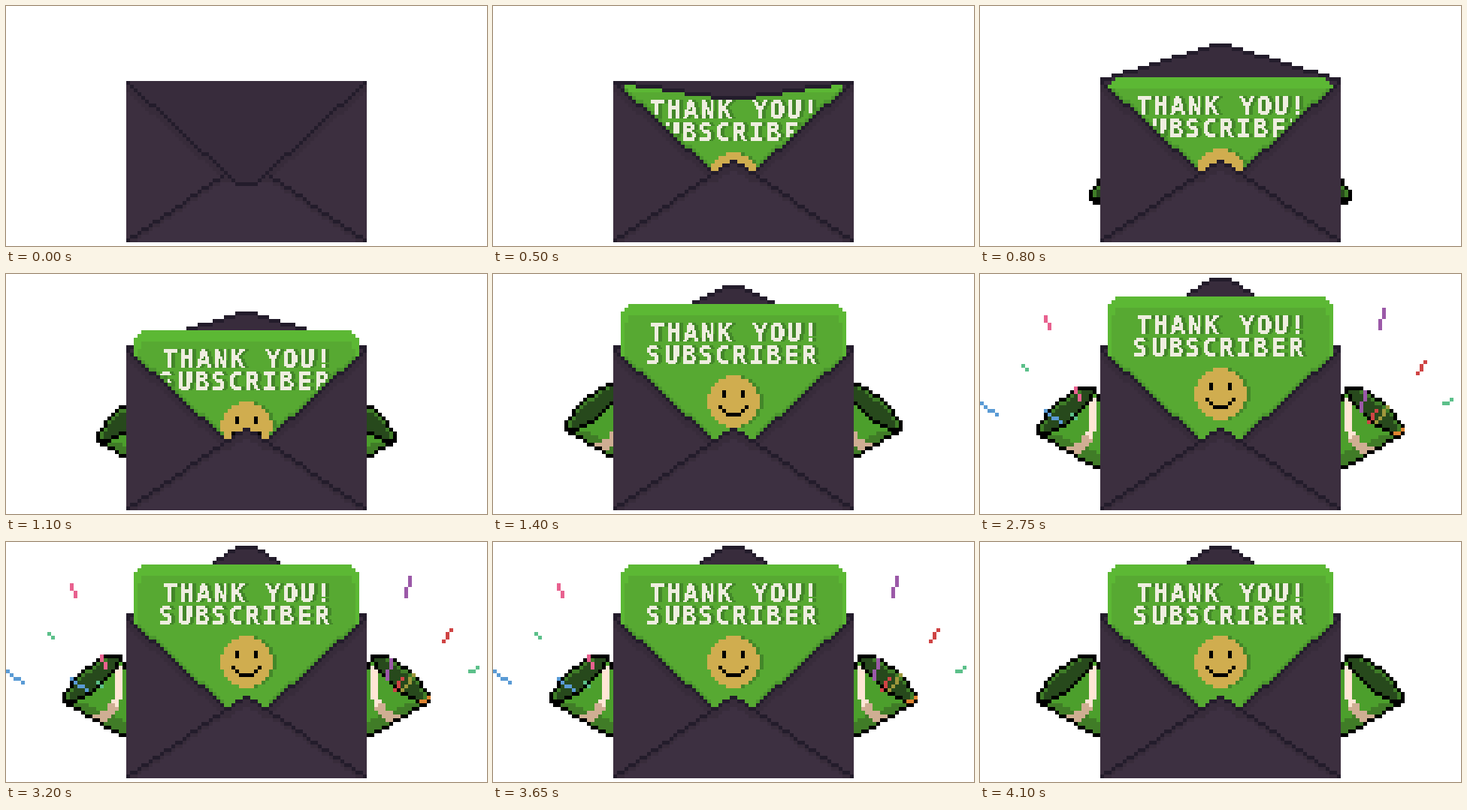
Animation of 640x320 px, one loop 5600 ms. Source, as an HTML page with a canvas:

```html
<!DOCTYPE html>
<html lang="en">
<head>
<meta charset="utf-8">
<title>Thank you card</title>
<style>
  html, body { margin: 0; width: 100%; height: 100%; overflow: hidden; background: #fff; }
  canvas { display: block; width: 100%; height: 100%; image-rendering: pixelated; }
</style>
</head>
<body>
<canvas id="stage" width="640" height="320" role="img" aria-label="THANK YOU! SUBSCRIBER"></canvas>
<script>
const ctx = document.getElementById('stage').getContext('2d');
const LOOP = 5600, CELL = 5, COLS = 128, TEXT_CELL = 2.5;
const INK = '#231c2b', FLAP = '#382c3c', SIDE = '#3c2f3f', FRONT = '#3d3041', SHADE = '#372b3a';
const GREEN = '#57a932', LIGHT = '#5cb834', DARK = '#438729', GOLD = '#d0ad4f', BLACK = '#000';

const clamp01 = v => Math.max(0, Math.min(1, v));
const smooth = p => p * p * (3 - 2 * p);
const mix = (a, b, p) => Math.round(a + (b - a) * p);

function px(x, y, w, h, color) {
  ctx.fillStyle = color;
  ctx.fillRect(x * CELL, y * CELL, w * CELL, h * CELL);
}

// Envelope

// Runs fn for each envelope column with its distance from the nearer side.
function columns(fn) {
  for (let x = 32; x < 96; x++) fn(x, Math.min(x, COLS - 1 - x) - 32);
}

const seam = d => Math.round(62 - d * 21 / 31);
const flapEdge = (d, h) => Math.trunc(h * Math.min(1, 1.1 * (d + 0.5) / 32));

function flapUp(h) {
  columns((x, d) => {
    const top = 19 + flapEdge(d, h);
    px(x, top, 1, 24 - top, FLAP);
    px(x, top, 1, 1, INK);
  });
}

function flapDown(h) {
  columns((x, d) => {
    const e = flapEdge(d, h);
    px(x, 20, 1, e, FLAP);
    px(x, 20 + e, 1, 1, INK);
  });
}

function pocket() {
  columns((x, d) => {
    const s = seam(d);
    const top = Math.min(Math.round(20 + d * 12 / 13), s);
    if (d > 2 && top < s) px(x, top - 1, 1, 1, '#4b962d');
    px(x, top, 1, s - top, SIDE);
    px(x, s, 1, 63 - s, FRONT);
    px(x, top + 1, 1, 2, SHADE);
    px(x, s + 1, 1, Math.min(1, 62 - s), SHADE);
    px(x, top, 1, 1, INK);
    px(x, s, 1, 1, INK);
  });
}

// Card

// Renders the two lines coarsely and hardens their edges into blocks.
function textSprite(color) {
  const sprite = document.createElement('canvas');
  sprite.width = 256;
  sprite.height = 26;
  const g = sprite.getContext('2d');
  g.font = 'bold 13.6px "DejaVu Sans Mono", monospace';
  g.textAlign = 'center';
  g.fillStyle = color;
  const line = (text, x, y) =>
    [...text].forEach((ch, i) => g.fillText(ch, Math.round(x + i * 9.15), y));
  line('THANK YOU!', 86.6, 10);
  line('SUBSCRIBER', 85.4, 22);
  const image = g.getImageData(0, 0, sprite.width, sprite.height);
  for (let i = 3; i < image.data.length; i += 4) image.data[i] = image.data[i] > 115 ? 255 : 0;
  g.putImageData(image, 0, 0);
  return sprite;
}
const words = textSprite('#efeee0'), wordShade = textSprite(DARK);

function disc(cx, cy, r, color) {
  for (let dy = -r; dy < r; dy++) {
    const half = Math.round(Math.sqrt(r * r - 1 - (dy + 0.5) ** 2));
    px(cx - half, cy + dy, half * 2, 1, color);
  }
}

function face(y) {
  disc(65, y, 7, DARK);
  disc(64, y, 7, GOLD);
  for (const x of [61, 66]) px(x, y - 3, 1, 2, BLACK);
  for (let x = 60; x < 68; x++) px(x, y + Math.min(3, 4.5 - Math.abs(x - 63.5)), 1, 1, BLACK);
}

function card(y) {
  for (let i = 0; i < 3; i++) px(36 - i, y + i, 56 + 2 * i, 44 - y, LIGHT);
  px(36, y + 3, 56, 43 - y, GREEN);
  px(35, y + 5, 58, 41 - y, GREEN);
  ctx.imageSmoothingEnabled = false;
  for (const [sprite, shift] of [[wordShade, CELL], [words, 0]]) {
    ctx.drawImage(sprite, shift, (y + 5) * CELL, sprite.width * TEXT_CELL, sprite.height * TEXT_CELL);
  }
  face(y + 26);
}

// Party poppers

// s runs across the mouth, n along the cone.
function axes(x, y) {
  const dx = x + 0.5 - 22.9, dy = y + 0.5 - 36.3;
  return [0.76 * dx - 0.65 * dy, 0.65 * dx + 0.76 * dy];
}
function inMouth(x, y) {
  const [s, n] = axes(x, y);
  return (s / 9.8) ** 2 + (n / 3.2) ** 2 < 1;
}
function inPopper(x, y) {
  const [s, n] = axes(x, y);
  return inMouth(x, y) || (n > 0 && Math.abs(s) < 10.2 - 0.35 * n);
}
const onEdge = (test, x, y) =>
  !(test(x - 1, y) && test(x + 1, y) && test(x, y - 1) && test(x, y + 1));

function popperColor(x, y) {
  if (!inPopper(x, y)) return null;
  const [s, n] = axes(x, y);
  if (inMouth(x, y)) {
    if (onEdge(inMouth, x, y)) return BLACK;
    return (s / 8.8) ** 2 + ((n - 0.8) / 2.4) ** 2 < 1 ? '#27491c' : '#3f7d27';
  }
  if (onEdge(inPopper, x, y)) return BLACK;
  const band = 9.9 - 0.073 * (s + 3) ** 2;
  if (Math.abs(n - band) < 1.2) return s > 0 ? '#ffe6d5' : '#cfae93';
  return s > 0.5 * n - 8 ? '#4c9f2c' : '#407c27';
}

// Only the part beside the envelope is visible.
function poppers(ox, oy) {
  for (let y = 28; y < 62; y++) {
    for (let x = 14; x + ox < 33; x++) {
      const color = popperColor(x, y);
      if (!color) continue;
      px(x + ox, y + oy, 1, 1, color);
      px(COLS - 1 - x - ox, y + oy, 1, 1, color);
    }
  }
}

// Streamers fly through five phases; life holds the first and last one seen.
const STREAMERS = [
  { color: '#9b59a8', from: [101, 35], to: [107, 9], dash: [-1, 5], life: [0, 4] },
  { color: '#e8618f', from: [26, 34], to: [17, 11], dash: [1, 3], life: [0, 4] },
  { color: '#5a9bd5', from: [20, 36], to: [0, 34], dash: [4, 3], life: [0, 4] },
  { color: '#5cc08a', from: [26, 39], to: [11, 24], dash: [1, 1], life: [1, 4] },
  { color: '#cf4444', from: [102, 38], to: [118, 23], dash: [-2, 3], life: [1, 4] },
  { color: '#a0983c', from: [105, 38], to: [124, 18], dash: [-3, 4], life: [0, 3] },
  { color: '#e0842f', from: [108, 41], to: [134, 38], dash: [-2, 1], life: [0, 2] },
  { color: '#5cc08a', from: [101, 38], to: [125, 33], dash: [-2, 1], life: [2, 4] }
];

function burst(phase) {
  const p = smooth(phase / 4);
  for (const { color, from, to, dash: [dx, dy], life } of STREAMERS) {
    if (phase < life[0] || phase > life[1]) continue;
    const x = mix(from[0], to[0], p), y = mix(from[1], to[1], p);
    const length = Math.max(Math.abs(dx), Math.abs(dy));
    const shown = phase ? length : length >> 1;
    for (let i = 0; i <= shown; i++) px(mix(x, x + dx, i / length), mix(y, y + dy, i / length), 1, 1, color);
  }
}

// A new burst every three steps; the first and last flights show fully.
function confetti(k) {
  const last = 15, near = k % 3;
  if (k < 0 || k > last) return;
  if (k < last) burst(near);
  if (k > 3 && near === 1) burst(4);
  if (k === 3 || k === last) burst(3);
}

function flapHeight(step) {
  if (step <= 8) return 27 - 4.5 * step;
  return -9 - 9 * (1 - (1 - clamp01((step - 10) / 3)) ** 1.5);
}

function draw(t) {
  const step = t < 800 ? Math.floor(t / 100) : 8 + Math.floor((t - 800) / 150);
  const open = step >= 7;
  const h = flapHeight(step);
  const rise = Math.min(1, 1.1 * clamp01((step - 7) / 6) ** 1.5);
  px(0, 0, COLS, 64, '#fff');
  if (step >= 8) {
    const q = clamp01((step - 8) / 5);
    poppers(Math.round(14 * (1 - q) ** 0.8), Math.round(9 * (1 - q) - 4 * Math.sin(Math.PI * q)));
  }
  confetti(step - 14);
  if (open) flapUp(h);
  px(32, 20, 64, 26, FLAP);
  card(mix(20, 6, rise));
  pocket();
  if (!open) flapDown(h);
}

const start = performance.now();
function tick() {
  draw((performance.now() - start) % LOOP);
  requestAnimationFrame(tick);
}
tick();
</script>
</body>
</html>
```
